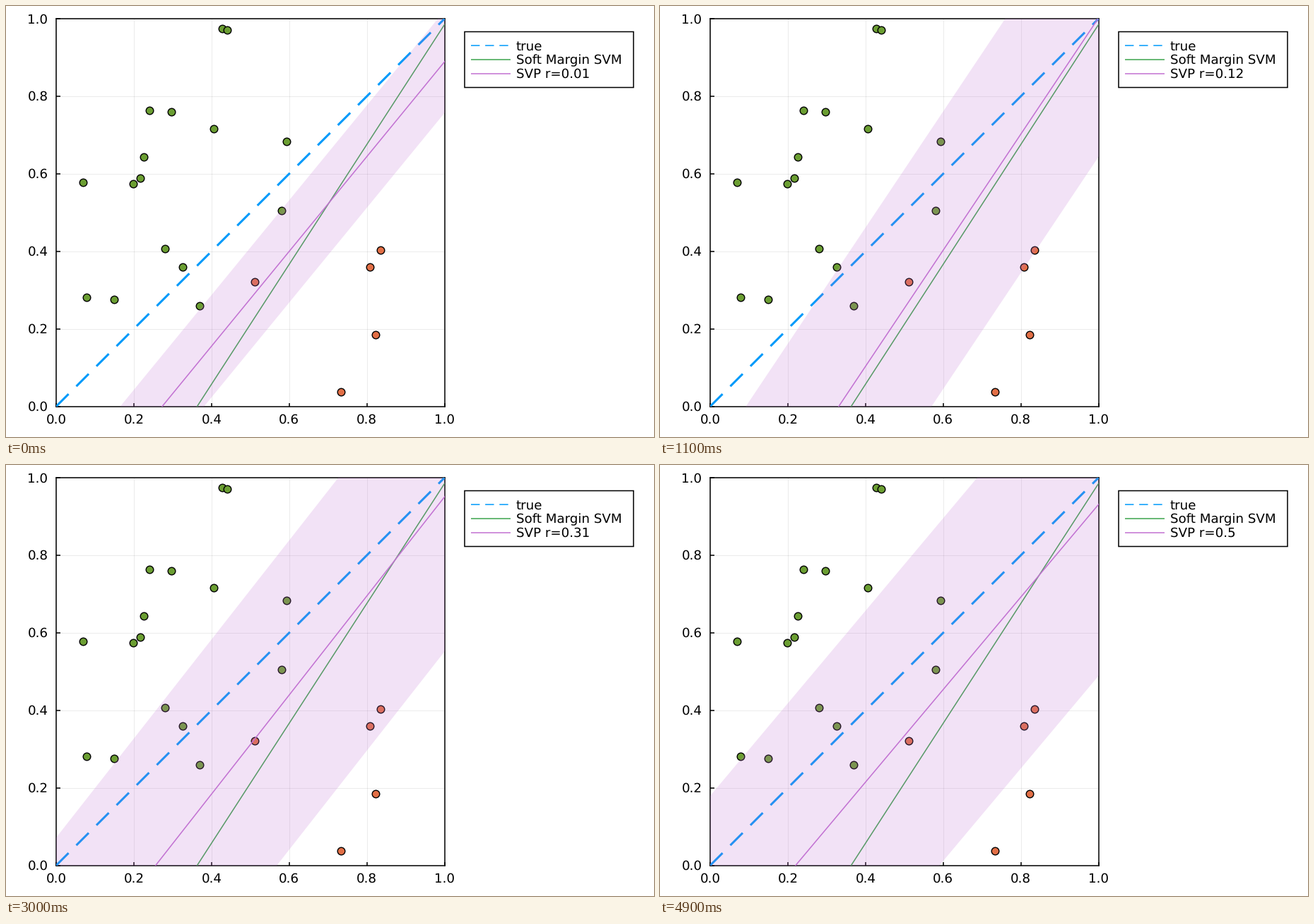
These frames come from a looping animation (917 by 611 pixels, 5000 ms). A matplotlib script:

```python
import matplotlib.pyplot as plt
import numpy as np
from matplotlib.animation import FuncAnimation
from matplotlib.patches import Rectangle

W, H, DPI = 917, 611, 100
FRAMES, INTERVAL = 50, 100
PX = 72 / DPI  # points per pixel
LEFT, RIGHT, TOP, BOTTOM = 71, 620.6, 18, 567.6
BLUE, ORANGE, GREEN, PURPLE, OLIVE = "#009afa", "#e26f46", "#3da44d", "#c271d2", "#6b9e32"
THIN, THICK = 1.53 * PX, 3.06 * PX
DASH = (0, (8.1, 5.06))

SAMPLES = [(.427, .975), (.441, .970), (.240, .763), (.296, .759), (.406, .717),
           (.593, .684), (.225, .644), (.216, .589), (.198, .574), (.069, .578),
           (.580, .505), (.280, .406), (.326, .360), (.369, .259), (.078, .281),
           (.150, .275), (.512, .321), (.835, .403), (.807, .359), (.823, .184),
           (.734, .038)]

# Key poses: frame, root on the x axis, height at x = 1, half height of the band
POSES = [(0, .273, .889, .132), (7, .313, .936, .322), (11, .331, 1.002, .358),
         (19, .277, .962, .374), (49, .220, .931, .442)]

plt.rcParams.update({"font.family": "DejaVu Sans", "font.size": 18.3 * PX,
                     "text.hinting": "none"})
fig = plt.figure(figsize=(W / DPI, H / DPI), dpi=DPI, facecolor="white")

ax = fig.add_axes([LEFT / W, 1 - BOTTOM / H, (RIGHT - LEFT) / W, (BOTTOM - TOP) / H])
ticks = np.linspace(0, 1, 6)
ax.set(xlim=(0, 1), ylim=(0, 1), xticks=ticks, yticks=ticks)
ax.set_axisbelow(True)
ax.grid(color="black", alpha=.1, lw=.76 * PX)
ax.tick_params(direction="in", length=5.5 * PX, width=THIN,
               labelbottom=False, labelleft=False)
for spine in ax.spines.values():
    spine.set(linewidth=THIN, zorder=1)

page = fig.add_axes([0, 0, 1, 1], facecolor="none")
page.set(xlim=(0, W), ylim=(H, 0))
page.axis("off")


def label(x, baseline, text, ha="left"):
    return page.text(x, baseline, text, ha=ha, va="baseline", color="black")


for t in ticks:
    label(LEFT + t * (RIGHT - LEFT), 592, f"{t:.1f}", "center")
    label(59.5, BOTTOM - t * (BOTTOM - TOP) + 6.3, f"{t:.1f}", "right")

ax.plot([0, 1], [0, 1], color=BLUE, lw=THICK, ls=DASH, dash_capstyle="butt", zorder=3)
for x, y in SAMPLES:
    ax.plot(x, y, "o", ms=10.6 * PX, mfc=OLIVE if y > x - .15 else ORANGE,
            mec="black", mew=1.4 * PX, snap=False, zorder=4)
ax.plot([.363, 1], [0, .985], color=GREEN, lw=THIN, zorder=5)
band, = ax.fill([0, 1, 1, 0], [0, 0, 1, 1], color=PURPLE, alpha=.2, lw=0, zorder=6)
fit, = ax.plot([], [], color=PURPLE, lw=THIN, zorder=7)

page.add_patch(Rectangle((649, 36.5), 239, 79, fc="white", ec="black", lw=THIN,
                         snap=False))
legend = []
for row, (name, color, style) in enumerate([("true", BLUE, DASH),
                                            ("Soft Margin SVM", GREEN, "-"),
                                            ("", PURPLE, "-")]):
    y = 56.4 + 19.85 * row
    page.plot([658, 714], [y, y], color=color, lw=THIN, ls=style,
              dash_capstyle="butt", solid_capstyle="butt")
    legend.append(label(722, y + 6, name))
fit_name = legend[-1]


def update(frame):
    steps, *tracks = zip(*POSES)
    root, height, half = (np.interp(frame, steps, track) for track in tracks)
    x = np.array([-.5, 1.5])
    y = height / (1 - root) * (x - root)
    fit.set_data(x, y)
    band.set_xy(np.column_stack([np.r_[x, x[::-1]], np.r_[y + half, (y - half)[::-1]]]))
    fit_name.set_text(f"SVP r={(frame + 1) / 100:g}")
    return band, fit, fit_name


anim = FuncAnimation(fig, update, frames=FRAMES, interval=INTERVAL,
                     init_func=lambda: update(0), repeat=True, repeat_delay=0)
plt.show()
```
